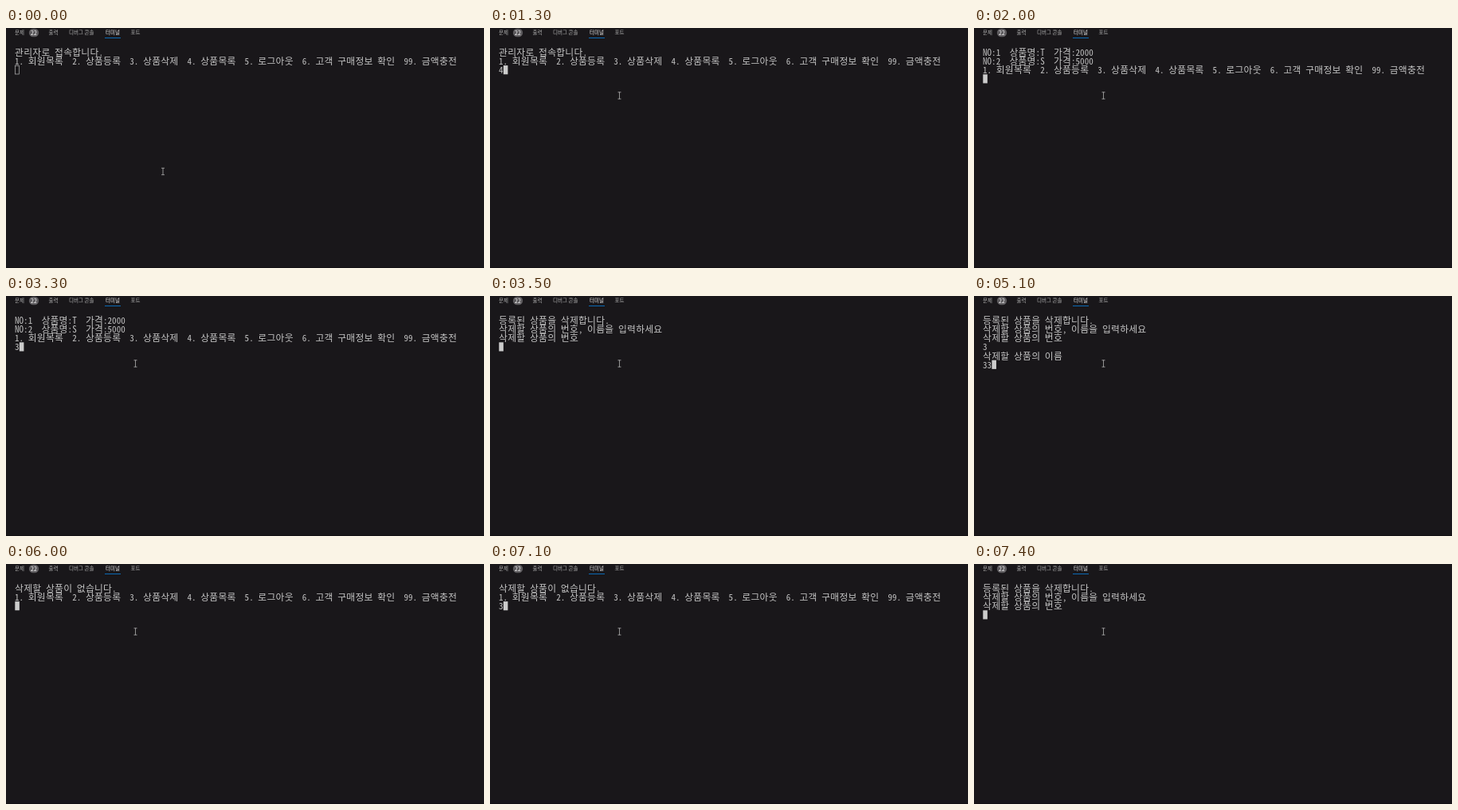
An HTML page with a canvas that plays this animation: 600 px wide and 302 px high, repeating every 8000 ms.

```html
<!DOCTYPE html>
<html lang="ko">
<head>
<meta charset="utf-8">
<title>터미널</title>
<style>
  html, body { margin: 0; width: 100%; height: 100%; overflow: hidden; background: #19171a; }
  canvas { display: block; width: 600px; height: 302px; }
</style>
</head>
<body>
<canvas id="stage"></canvas>
<script>
const LOOP = 8000;
const CELL = 5.55, LEFT = 11, TOP = 24.5, ROW = 11.2;
const BACKGROUND = '#19171a', TEXT = '#c4c4c4';
const SANS = '"Noto Sans CJK KR", "Noto Sans CJK", sans-serif';
const MONO = '"Noto Sans Mono CJK KR", "Noto Sans CJK KR", monospace';

const canvas = document.getElementById('stage');
const ctx = canvas.getContext('2d');
const ratio = window.devicePixelRatio || 1;
canvas.width = 600 * ratio;
canvas.height = 302 * ratio;

const menu = '1. 회원목록  2. 상품등록  3. 상품삭제  4. 상품목록  5. 로그아웃  6. 고객 구매정보 확인  99. 금액충전';
const login = ['관리자로 접속합니다.', menu];
const list = ['NO:1  상품명:T  가격:2000', 'NO:2  상품명:S  가격:5000', menu];
const remove = ['등록된 상품을 삭제합니다.', '삭제할 상품의 번호, 이름을 입력하세요', '삭제할 상품의 번호'];
const askName = [...remove, '3', '삭제할 상품의 이름'];
const missing = ['삭제할 상품이 없습니다.', menu];

// [start ms, printed lines, typed input]
const steps = [
  [0, login, ''],
  [1300, login, '4'],
  [1500, list, ''],
  [3300, list, '3'],
  [3500, remove, ''],
  [3800, remove, '3'],
  [4600, askName, ''],
  [4900, askName, '3'],
  [5000, askName, '33'],
  [6000, missing, ''],
  [7100, missing, '3'],
  [7300, remove, '']
];

function rect(x, y, w, h, color) {
  ctx.fillStyle = color;
  ctx.fillRect(x, y, w, h);
}

function label(text, x, y, size, color, align = 'left') {
  ctx.font = `${size}px ${SANS}`;
  ctx.textAlign = align;
  ctx.fillStyle = color;
  ctx.fillText(text, x, y);
}

function drawTabs() {
  const gray = '#b0b0b0';
  label('문제', 11, 8.3, 6.5, gray);
  ctx.fillStyle = '#5c5a5d';
  ctx.beginPath();
  ctx.roundRect(28.8, 0.8, 12.4, 10.4, 5.2);
  ctx.fill();
  label('22', 35, 8.5, 7, '#ffffff', 'center');
  label('출력', 53.5, 8.3, 6.5, gray);
  label('디버그 콘솔', 79, 8.3, 6.5, gray);
  label('터미널', 125, 8.3, 6.5, '#f0f0f0');
  label('포트', 156.5, 8.3, 6.5, gray);
  rect(124, 12, 20, 1, '#0b6ab5');
}

// Hangul takes two terminal cells, everything else one.
function drawLine(text, row) {
  const y = TOP + row * ROW + 10.3;
  let x = LEFT;
  ctx.fillStyle = TEXT;
  ctx.textAlign = 'center';
  for (const char of text) {
    const wide = char >= '가' && char <= '힣';
    const width = wide ? CELL * 2 : CELL;
    ctx.font = wide ? `300 11.8px ${SANS}` : `11.1px ${MONO}`;
    ctx.fillText(char, x + width / 2, y);
    x += width;
  }
}

function drawCaret(column, row, focused) {
  const x = LEFT + column * CELL, y = TOP + row * ROW;
  if (focused) {
    rect(x + 0.3, y + 0.2, CELL, ROW, '#cccccc');
  } else {
    ctx.strokeStyle = '#b8b8b8';
    ctx.lineWidth = 0.7;
    ctx.strokeRect(x + 0.5, y + 0.6, CELL - 0.5, ROW - 0.7);
  }
}

function drawPointer(time) {
  const tick = Math.floor(time / 100);
  const p = Math.min(tick / 9, 1);
  const ease = p * p * (3 - 2 * p);
  const x = 197 - 34.5 * ease, y = 180.5 - 95.5 * ease;
  ctx.strokeStyle = '#c8c8c8';
  ctx.lineWidth = 0.7;
  ctx.beginPath();
  for (const end of [-4.2, 4.2]) {
    ctx.moveTo(x - 2, y + end);
    ctx.lineTo(x + 2, y + end);
  }
  ctx.moveTo(x, y - 4.2);
  ctx.lineTo(x, y + 4.2);
  ctx.stroke();
}

function draw(now) {
  const time = now % LOOP;
  const [, lines, input] = steps.findLast(step => step[0] <= time);
  ctx.setTransform(ratio, 0, 0, ratio, 0, 0);
  rect(0, 0, 600, 302, BACKGROUND);
  rect(0, 301, 600, 1, '#131114');
  drawTabs();
  [...lines, input].forEach(drawLine);
  drawCaret(input.length, lines.length, time >= 900);
  drawPointer(time);
}

const start = performance.now();
function frame() {
  draw(performance.now() - start);
  requestAnimationFrame(frame);
}
frame();
</script>
</body>
</html>
```
